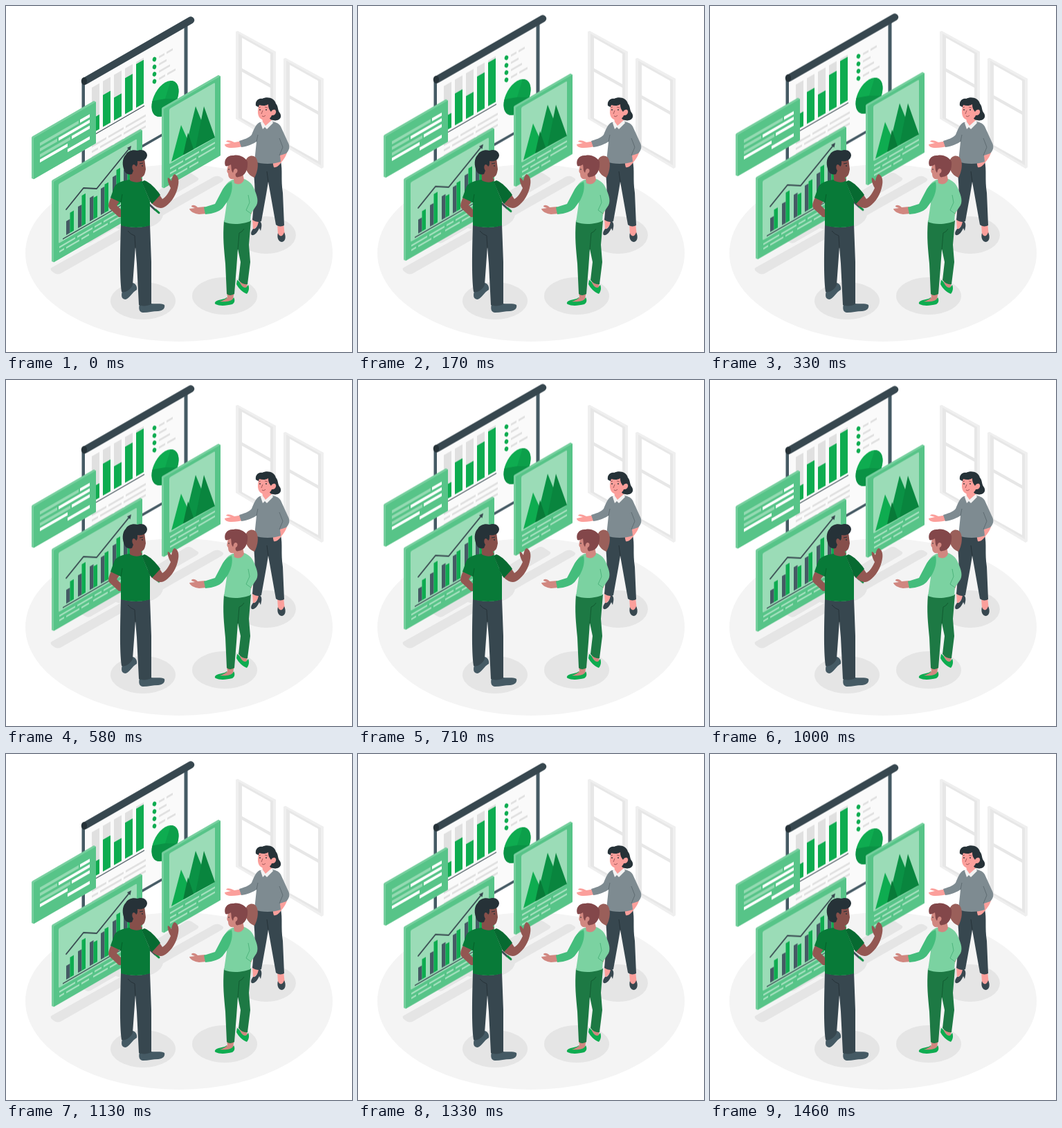
These frames come from a looping animation (500 by 500 pixels, 1500 ms). An HTML page:

```html
<!DOCTYPE html>
<html lang="en">
<head>
<meta charset="utf-8">
<title>Team reviewing charts</title>
<style>
html, body { margin: 0; width: 100%; height: 100%; overflow: hidden; background: #fff; }
svg { display: block; width: 100vw; height: 100vh; }
.float { animation: float 1.5s linear infinite; }
@keyframes float { 50% { transform: translateY(-10px); } }
.edge { fill: #76cf9e; }
.face { fill: #57c488; }
.pane { fill: #9bdcb7; }
.green { fill: #0eac50; }
.mid { fill: #0a9245; }
.deep { fill: #087a38; }
.slate { fill: #37474f; }
.steel { fill: #455a64; }
.ink { fill: #263238; }
.shade { fill: #e5e5e5; }
.rule { fill: none; stroke-width: 3; }
.small { stroke-width: 2.5; }
.gray { stroke: #e0e0e0; }
.mint { stroke: #a8e2c1; }
.white { stroke: #fff; }
.line { fill: none; stroke: #37474f; }
.brown { fill: #864f4a; }
.arm { fill: #935752; }
.tan { fill: #d18780; }
.pink { fill: #fb9f9b; }
</style>
</head>
<body>
<svg viewBox="0 0 500 500">
  <!-- floor -->
  <ellipse cx="250" cy="357" rx="222" ry="128" fill="#f4f4f4"/>
  <g class="shade">
    <path d="M66 378L300 247Q304 245 308 246L313 249Q316 251 312 254L80 386Q75 389 70 386L66 383Q63 380 66 378z"/>
    <path d="M110 334L260 242Q264 240 268 242L277 248Q280 250 276 253L122 342Q118 344 114 341L109 338Q107 336 110 334z"/>
    <ellipse cx="181" cy="301" rx="46" ry="23"/>
    <ellipse cx="198" cy="426" rx="47" ry="27"/>
    <ellipse cx="316" cy="419" rx="47" ry="27"/>
    <ellipse cx="376" cy="331" rx="43" ry="27"/>
  </g>

  <!-- windows -->
  <defs>
    <g id="window">
      <path d="M0 1L3 0L58 30V158L55 160L0 127z" fill="#efefef"/>
      <path d="M4 4L54 32V155L4 126z" fill="#e7e7e7"/>
      <path d="M9 10L50 33V77L9 54zM9 59L50 82V149L9 126z" fill="#fff"/>
    </g>
  </defs>
  <use href="#window" x="332" y="36"/>
  <use href="#window" x="401" y="75"/>

  <g class="float">
    <!-- projector screen -->
    <path class="steel" d="M109.500 108L262.500 22V167L109.500 255z"/>
    <path d="M114 112L257.500 29V166L114 248z" fill="#fafafa"/>
    <path class="line" d="M114 108.500L267 20.500" stroke-width="10.500" stroke-linecap="round"/>
    <ellipse class="ink" cx="113" cy="108.500" rx="4" ry="5.500"/>
    <g transform="translate(124 118) skewY(-30)">
      <path fill="#e0e0e0" d="M0 0h11v66h-11zM16 0h11v66h-11zM32 0h11v66h-11zM48 0h11v66h-11zM64 0h11v66h-11z"/>
      <path class="green" d="M0 45h11v21h-11zM16 20h11v46h-11zM32 33h11v33h-11zM48 14h11v52h-11zM64 3h11v63h-11z"/>
      <path class="line" d="M-4 70H76" stroke-width="1.300"/>
      <path class="rule gray" d="M0 85h21m3 0h22m3 0h29M0 93h9m3 0h31m3 0h32M0 101h30m3 0h12m3 0h30M0 109h16m3 0h40"/>
    </g>
    <g class="green">
      <ellipse cx="214.500" cy="77" rx="2.700" ry="3.400" transform="rotate(15 214.500 77)"/>
      <ellipse cx="214.500" cy="88" rx="2.700" ry="3.400" transform="rotate(15 214.500 88)"/>
      <ellipse cx="214.500" cy="98.500" rx="2.700" ry="3.400" transform="rotate(15 214.500 98.500)"/>
      <ellipse cx="214.500" cy="109" rx="2.700" ry="3.400" transform="rotate(15 214.500 109)"/>
    </g>
    <path class="rule gray" transform="translate(221 74) skewY(-30)" d="M0 0h8m3 0h9M0 10.500h11M0 21h16M0 31.500h9m3 0h12"/>
    <g transform="translate(230 134) skewY(-30)">
      <ellipse class="green" rx="19.500" ry="23.500"/>
      <path d="M0 0L8 -21.400A19.500 23.500 0 0 1 17.500 10.400z" fill="#0c9f4a"/>
      <path class="mid" d="M0 0L17.500 10.400A19.500 23.500 0 0 1 -18.500 -7.400z"/>
    </g>

    <!-- text panel -->
    <g transform="translate(37 189) skewY(-30)">
      <path class="edge" d="M1 0H90L93 3.500V62L92 63H3L0 60V1z"/>
      <path class="face" d="M4 3.500H93V63H3V4.500z"/>
      <g class="rule" style="stroke-width:4.500">
        <path class="mint" opacity=".75" d="M12 18H68M12 26H37M12 34.500H56"/>
        <path class="white" d="M70 18H84M39 26H84M58 34.500H84M12 42H52M52 50H84"/>
      </g>
    </g>

    <!-- bar chart panel -->
    <g transform="translate(66 252) skewY(-30)">
      <path class="edge" d="M1 0H128L131 3.500V119L130 120H3L0 117V1z"/>
      <path class="face" d="M4 3.500H131V120H3V4.500z"/>
      <rect class="pane" x="10" y="11" width="113" height="86" rx="2"/>
      <path class="steel" d="M21 71h5.500V91H21zM38 60h5.500V91H38zM55 57h5.500V91H55zM71 53h5.500V91H71zM88 46h5.500V91H88zM104 45h5.500V91H104z"/>
      <path class="green" d="M26.500 62h5.500V91h-5.500zM43.500 47h5.500V91h-5.500zM60.500 60h5.500V91h-5.500zM76.500 50h5.500V91h-5.500zM93.500 39h5.500V91h-5.500zM109.500 37h5.500V91h-5.500z"/>
      <path class="line" d="M16 94H117" stroke-width="1.300"/>
      <path class="rule small mint" d="M11 103h23m3 0h22m3 0h10m3 0h32M11 109.500h7m3 0h19m3 0h11m6 0h21m3 0h20"/>
    </g>
    <path class="line" d="M87 294L112 263L131 264L178 206" stroke-width="1.800" stroke-linejoin="round" stroke-linecap="round"/>
    <path class="slate" d="M181 202L179.500 209L175 205z"/>

    <!-- mountain chart panel -->
    <g transform="translate(225 147) skewY(-30)">
      <path class="edge" d="M1 0H82L85 3.500V117L84 118H3L0 115V1z"/>
      <path class="face" d="M4 3.500H85V118H3V4.500z"/>
      <rect class="pane" x="11" y="8" width="66" height="80" rx="2"/>
      <path class="rule small mint" d="M12 95h19m3 0h20m3 0h20M12 102h9m3 0h26m3 0h24M12 109h25m3 0h13"/>
    </g>
    <path class="mid" d="M257 215L274 145L294 194z"/>
    <path class="green" d="M239 225L253 172L269 208z"/>
    <path class="deep" d="M256 215L263 183L271 207z"/>
    <path d="M274 205L286 145L302 190z" fill="#09853e"/>

    <!-- marker -->
    <path class="line" d="M203 283L216 295" stroke-width="2.800"/>
    <path d="M216 294.500L221 298.800" stroke="#0b8a40" stroke-width="3" stroke-linecap="round"/>
  </g>

  <!-- man -->
  <path class="steel" d="M168 412C166 419 167 424 173 424C179 422 182 414 189 410C190 405 187 401 183 400zM193 431C191 438 193 443 198 443C206 443 212 441 220 441C228 440 230 436 229 432C224 429 215 431 210 430z"/>
  <path class="slate" d="M166 316C178 321 198 321 208 316L210 370L210 431C204 434 196 434 192 432L189 372L187 348L183 403C180 410 172 415 167 413C164 390 165 350 166 316z"/>
  <path d="M187 350L186 332Q180 330 176 325" fill="none" stroke="#263238"/>
  <path class="arm" d="M153 274C149 283 146 289 150 293L163 305H168V296L160 288L167 278z"/>
  <path class="arm" d="M208 282C214 290 222 294 228 291C236 287 245 276 248 263C251 252 249 246 244 243C242 243 240 247 239 253C238 252 237 249 234 248C233 250 234 256 238 263C235 270 231 276 226 279L220 270z"/>
  <path class="deep" d="M180 251C168 252 158 256 156 263L151 277L166 284V317C178 321 198 321 208 317V282L196 253z"/>
  <path d="M196 254L208 282L211 286L223 273C216 263 208 255 200 252z" fill="#076a31"/>
  <path d="M166 284L168 272" stroke="#056029"/>
  <path class="brown" d="M178 224L179 252C186 256 194 255 197 252L195 248C201 246 201 240 202 236L200 220z"/>
  <path class="ink" d="M172 240C167 230 168 220 173 215C176 209 184 207 190 209C197 206 204 210 204 216C203 223 197 225 190 224C190 229 190 231 188 232C184 225 180 232 184 238L182 243C178 244 174 243 172 240z"/>
  <circle class="ink" cx="197" cy="231" r=".9"/>
  <path d="M193 228L198 227" stroke="#263238"/>

  <!-- woman in dark trousers -->
  <path class="pink" d="M356 307L366 304L365 316L357 324zM392 314H401L403 332L398 338L393 330z"/>
  <path class="slate" d="M357 322C360 323 364 319 365 311C369 310 370 316 369 320L368 325L366 321C363 328 359 332 355 331C353 328 355 325 357 322zM393 328C395 334 400 334 402 327C405 333 404 340 399 341C394 341 391 335 393 328z"/>
  <path class="slate" d="M360 224C356 245 361 255 359 275L356 309C360 312 366 313 369 311L376 272L379 254L390 316C393 319 399 319 402 317L400 270C397 250 400 238 397 224z"/>
  <path d="M379 254L377 239" stroke="#263238"/>
  <path class="pink" d="M342 195L330 197C325 194 319 193 318 196L325 198L316 200C316 203 320 205 326 205C332 205 339 204 345 202z"/>
  <path class="pink" d="M400 208L390 218C385 221 385 226 387 233C390 234 394 231 397 227C401 222 405 217 407 209z"/>
  <path fill="#7e8b91" d="M367 168C361 170 358 179 355 186C351 191 343 193 337 195L340 204C350 203 357 199 362 196L359 225C370 229 386 229 397 225L396 216L405 213C411 207 410 201 407 196L397 174C394 169 388 167 383 167z"/>
  <path d="M395 191L400 204L395 216M362 196L364 186" fill="none" stroke="#5f6c72"/>
  <path class="pink" d="M370 157L371 172L376 174L384 167L385 155z"/>
  <path d="M370 166L375 173L384 165L386 169L377 178L374 175L371 178L368 169z" fill="#f3f3f3"/>
  <path class="ink" d="M361 144C360 138 364 133 370 134C378 130 388 133 390 141C394 146 392 150 396 155C400 162 393 167 386 165C381 165 379 160 381 155z"/>
  <path class="pink" d="M366 143C363 150 363 159 368 163C374 167 382 164 384 158C389 159 392 153 389 150C386 149 384 151 383 153C380 149 379 147 379 142C374 145 370 144 366 143z"/>
  <g class="ink"><circle cx="367" cy="150" r=".9"/><circle cx="376" cy="150" r=".9"/></g>
  <path d="M371 151L369 156M370 159Q373 161 375 158M365 147L368 146M374 146L378 147" fill="none" stroke="#8d4649" stroke-width=".8"/>

  <!-- woman with ponytail -->
  <path class="green" d="M303 427C309 423 315 425 319 421C322 426 327 425 329 421C331 424 331 429 327 431C319 433 309 434 303 431C301 430 302 428 303 427zM334 396C339 398 339 404 344 406C348 407 349 404 350 403C352 407 351 413 348 416C342 414 336 408 333 402z"/>
  <path class="tan" d="M319 413H330L328 423C325 427 317 428 309 427Q316 425 320 421zM337 394L349 398L348 406C345 409 340 405 338 399z"/>
  <path fill="#1d7944" d="M315 310C313 335 315 350 317 372L319 416C322 419 327 418 330 416L333 379L335 351L339 370L336 396C340 401 345 403 349 402L353 370L351 345L354 310z"/>
  <path d="M335 352L337 328Q341 327 344 322" fill="none" stroke="#125b31"/>
  <path class="tan" d="M288 290L277 291C273 287 268 287 268 290L273 292L265 293C266 297 272 300 279 301L290 300z"/>
  <path class="tan" d="M350 296L357 295L352 306L346 309z"/>
  <path fill="#7bd2a1" d="M328 251C322 253 318 257 315 263L319 285L315 312C326 317 344 315 353 311L354 300L362 288C366 280 361 270 358 263C355 256 350 252 344 250z"/>
  <path fill="#44bd7c" d="M326 254C320 256 315 261 312 267L302 286L286 291L288 301C300 300 308 297 313 292L321 281C326 272 328 262 326 254z"/>
  <path d="M350 273L352 284L347 295L354 300" fill="none" stroke="#4eb57d"/>
  <path class="tan" d="M321 229C320 236 318 239 321 242C321 248 324 251 329 250L330 256C336 259 342 257 344 251L341 237L335 228z"/>
  <path fill="#9a5f5a" d="M347 222C349 217 356 214 361 219C366 226 364 239 359 248C353 246 347 240 346 232z"/>
  <path fill="#83474a" d="M317 231C314 222 320 215 329 216C337 214 346 219 349 225C350 236 346 246 336 247C332 249 331 244 332 242C336 240 335 234 331 235C328 237 329 240 328 241C325 238 326 233 325 229C322 231 319 232 317 231z"/>
  <circle class="ink" cx="322" cy="236" r=".8"/>
</svg>
</body>
</html>
```
